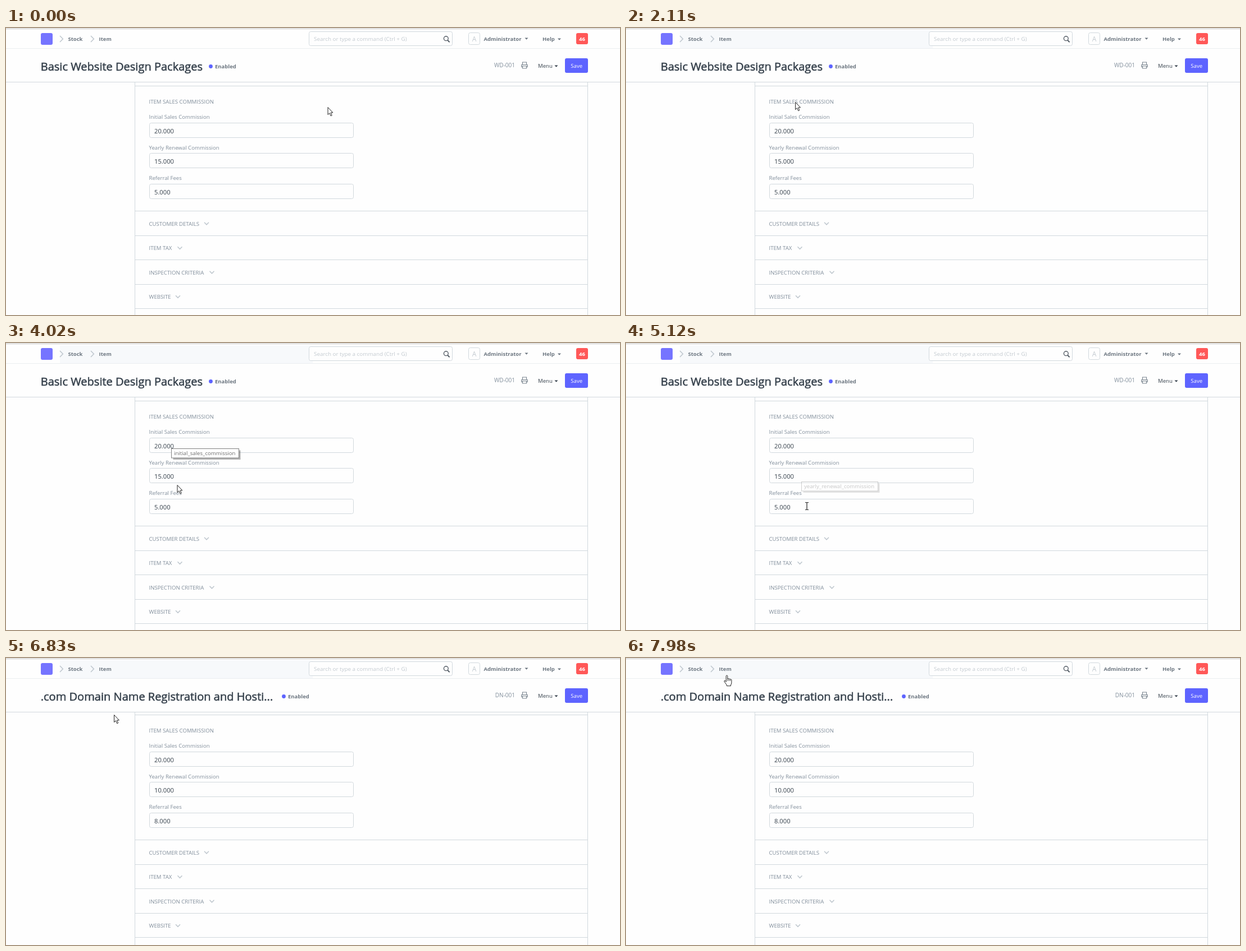
Animation of 1093x512 px, one loop 8 s. Source, as an HTML page:

```html
<!DOCTYPE html>
<html lang="en">
<head>
<meta charset="utf-8">
<title>Item form</title>
<style>
  html, body { margin: 0; width: 100%; height: 100%; overflow: hidden; background: #fefefe; }
  svg { display: block; width: 100%; height: 100%; }
  text { font-family: "Open Sans", "Noto Sans", sans-serif; font-size: 9.65px; fill: #818e9b; white-space: pre; }
  .strong { font-weight: 700; font-size: 9.5px; fill: #6c7680; }
  .title { font-size: 20.05px; fill: #36414c; stroke: #36414c; stroke-width: .55px; }
  .value { font-size: 11.2px; fill: #36414c; }
  .section { font-size: 9.65px; }
  .box { fill: #fefefe; stroke: #d1d8dd; }
  .rule { fill: none; stroke: #d1d8dd; }
  .chevron { fill: none; stroke: #c0c8cf; stroke-width: 1.6; }
  .pointer { fill: #fff; stroke: #222; stroke-linejoin: round; }
</style>
</head>
<body>
<svg id="stage" viewBox="0 0 1093 512" preserveAspectRatio="none"></svg>
<script>
const LOOP = 8000, SWITCH_AT = 6070;
const stage = document.getElementById("stage");

function add(parent, tag, attrs = {}, content) {
  const el = document.createElementNS("http://www.w3.org/2000/svg", tag);
  for (const key in attrs) el.setAttribute(key, attrs[key]);
  if (content !== undefined) el.textContent = content;
  parent.appendChild(el);
  return el;
}
const group = parent => add(parent, "g");
const path = (parent, d, attrs) => add(parent, "path", { d, ...attrs });
const label = (parent, x, y, content, attrs) => add(parent, "text", { x, y, ...attrs }, content);
const rect = (parent, x, y, width, height, attrs) => add(parent, "rect", { x, y, width, height, ...attrs });
const show = (el, on) => el.setAttribute("visibility", on ? "visible" : "hidden");
const caret = (parent, x, y, fill) => path(parent, `M${x - 3} ${y - 1.5}h6l-3 3.2z`, { fill });
const crumbArrow = x => path(stage, `M${x} 14l5.3 5.5l-5.3 5.5`, { class: "chevron" });

function buildForm(values) {
  const form = group(stage);
  path(form, "M229.5 90V520M1035.5 90V520", { class: "rule" });
  for (const y of [103.5, 326.5, 370.5, 413.5, 457.5, 500.5])
    path(form, `M229.5 ${y}H1035.5`, { class: "rule" });
  label(form, 254.5, 135, "ITEM SALES COMMISSION", { class: "section" });
  ["Initial Sales Commission", "Yearly Renewal Commission", "Referral Fees"].forEach((name, i) => {
    const y = i * 54.6;
    label(form, 254.5, 162 + y, name);
    rect(form, 255.5, 169.5 + Math.floor(y), 363, 26, { class: "box", rx: 3 });
    label(form, 264, 187.5 + y, values[i], { class: "value" });
  });
  [["CUSTOMER DETAILS", 357], ["ITEM TAX", 309.5], ["INSPECTION CRITERIA", 366.5], ["WEBSITE", 306]]
    .forEach(([name, x], i) => {
      const y = 349 + i * 43.5;
      label(form, 254.5, y + 3.7, name, { class: "section" });
      path(form, `M${x - 4} ${y - 2.2}l4 4l4 -4`, { class: "chevron" });
    });
  return form;
}

function buildHeading(title, dotX, code) {
  const heading = group(stage);
  label(heading, 61.7, 75.5, title, { class: "title" });
  add(heading, "circle", { cx: dotX, cy: 68.5, r: 3.4, fill: "#5e64ff" });
  label(heading, dotX + 7.5, 72, "Enabled", { class: "strong" });
  label(heading, 906, 70, code, { "text-anchor": "end", style: "font-size:10px" });
  return heading;
}

function buildTooltip(x, y, width, content) {
  const tip = group(stage);
  rect(tip, x + 3, y + 3, width, 16.5, { fill: "#000", opacity: .3 });
  rect(tip, x, y, width, 16.5, { fill: "#fff", stroke: "#808080" });
  label(tip, x + 4.5, y + 11.5, content, { style: "fill:#6b6b6b" });
  return tip;
}

rect(stage, 0, 0, 1093, 512, { fill: "#fefefe" });
const forms = [
  buildForm(["20.000", "15.000", "5.000"]),
  buildForm(["20.000", "10.000", "8.000"])
];
forms[1].setAttribute("transform", "translate(0 -2)");

// Fixed navigation and page head
rect(stage, 0, 0, 1093, 96, { fill: "#fefefe" });
const navTint = rect(stage, 96, 4, 450, 32, { fill: "#f7f9fb" });
path(stage, "M0 1.5H1093", { stroke: "#c4c4c4" });
path(stage, "M0 36.5H1093", { stroke: "#ebeef0" });
path(stage, "M0 96.5H1093", { class: "rule" });
rect(stage, 62, 9, 21, 21, { rx: 3, fill: "#7574ff" });
crumbArrow(96);
const itemArrow = crumbArrow(151);
label(stage, 110.5, 23, "Stock", { class: "strong" });
const itemCrumb = label(stage, 165.5, 23, "Item", { class: "strong" });
rect(stage, 539.5, 6.5, 255, 25, { class: "box", rx: 3 });
label(stage, 548, 23, "Search or type a command (Ctrl + G)", { style: "font-size:9.86px;fill:#c3cad0" });
add(stage, "circle", { cx: 783.3, cy: 18.7, r: 3.9, fill: "none", stroke: "#555d66", "stroke-width": 1.4 });
path(stage, "M786.2 21.8l3.4 3.6", { stroke: "#555d66", "stroke-width": 2 });
rect(stage, 823.5, 8.5, 20, 21, { class: "box", rx: 3 });
label(stage, 833.5, 23.5, "A", { "text-anchor": "middle", style: "font-size:12px;fill:#c3cad0" });
label(stage, 850.5, 23, "Administrator", { class: "strong" });
caret(stage, 926.5, 19, "#6c7680");
label(stage, 955, 23, "Help", { class: "strong" });
caret(stage, 985, 20, "#6c7680");
rect(stage, 1015, 9, 21, 20, { rx: 3, fill: "#ff5858" });
label(stage, 1025.5, 23, "46", { class: "strong", "text-anchor": "middle", style: "fill:#fff" });

path(stage, "M919.5 65v-4h7v4M919.5 69.5h-1.7v-4h10.4v4h-1.7M919.5 68h7v4h-7z",
  { fill: "none", stroke: "#7d8892", "stroke-width": 1.2 });
label(stage, 947, 71, "Menu", { style: "fill:#36414c" });
caret(stage, 979.5, 68, "#36414c");
rect(stage, 995, 54, 41, 26, { rx: 3, fill: "#5e64ff" });
label(stage, 1015.7, 70.8, "Save", { "text-anchor": "middle", style: "fill:#fff" });

const headings = [
  buildHeading("Basic Website Design Packages", 364.5, "WD-001"),
  buildHeading(".com Domain Name Registration and Hosti...", 494.5, "DN-001")
];

const statusBar = path(stage, "M-1 513V509.5H359Q361.5 509.5 361.5 513", { fill: "#f4f4f4", stroke: "#cfcfcf" });

const tooltips = [
  { el: buildTooltip(294.5, 188.5, 120, "initial_sales_commission"), from: 3870, fade: 4090 },
  { el: buildTooltip(312.5, 247.5, 136, "yearly_renewal_commission"), from: 4850, fade: 5020 }
];

// Each pointer is drawn around its hot spot at 0,0
const pointers = { arrow: group(stage), hand: group(stage), beam: group(stage) };
path(pointers.arrow, "M.5 .5V13.6L3.4 10.8L5.6 15.8L7.7 14.9L5.6 10H9.4Z", { class: "pointer" });
path(pointers.hand,
  "M-1.3 11.5V1.3Q-1.3 0 0 0T1.3 1.3V6Q2.6 4.9 3.7 6.4Q5 5.5 6 7Q7.6 6.2 8.4 8V13Q8.4 15 7 17V18.8H-.2V17L-4.6 11Q-5 9 -3.2 9.3Z",
  { class: "pointer" });
path(pointers.hand, "M1.3 6V10M3.7 6.6V10M6 7.2V10", { stroke: "#222", "stroke-width": .8 });
path(pointers.beam, "M-3 -6.5H-1L0 -5.8L1 -6.5H3M0 -6V6M-3 6.5H-1L0 5.8L1 6.5H3",
  { fill: "none", stroke: "#222", "stroke-width": 1.2 });

// time, x, y of the pointer's hot spot
const route = [
  [0, 572.5, 141], [300, 572.5, 141], [650, 410, 62], [900, 215, 18], [1010, 182, 20],
  [1190, 182, 20], [1320, 189.5, 34], [1570, 189.5, 34], [1900, 255, 98], [2370, 336, 164],
  [2750, 322, 188], [3080, 289, 138], [3370, 289, 138], [3640, 298, 180], [3890, 298, 180],
  [4020, 304.5, 253], [4200, 312, 254], [4450, 316, 239], [4850, 316, 239], [5120, 322, 291],
  [5320, 365, 190], [5560, 440, -25], [6440, 225, -25], [6560, 220, 20], [6830, 192, 101],
  [7260, 187, 78], [7290, 187, 78], [7460, 185, 72], [7770, 185, 72], [7980, 179.5, 31], [LOOP, 179.5, 31]
];

// Rate of change at a stop; zero beside a rest
function slope(i, axis) {
  const [a, b, c] = [route[i - 1], route[i], route[i + 1]];
  if (!a || !c) return 0;
  const before = (b[axis] - a[axis]) / (b[0] - a[0]), after = (c[axis] - b[axis]) / (c[0] - b[0]);
  return before * after > 0 ? 2 * before * after / (before + after) : 0;
}

function pointerAt(t) {
  const i = route.findIndex((stop, k) => k && t < stop[0]) - 1;
  const a = route[i], b = route[i + 1], span = b[0] - a[0], u = (t - a[0]) / span;
  return [1, 2].map(axis => {
    const ease = u * u * (3 - 2 * u);
    return a[axis] + (b[axis] - a[axis]) * ease
      + span * u * (1 - u) * ((1 - u) * slope(i, axis) - u * slope(i + 1, axis));
  });
}

function pointerKind(x, y, page) {
  const titleEnd = page ? 477 : 350;
  if (x > 160 && x < 196 && y > 8 && y < 36) return "hand";
  if (x > 62 && x < titleEnd && y > 56 && y < 82) return "hand";
  const inInput = [169, 224, 279].some(top => y > top - 2 * page && y < top + 26 - 2 * page);
  return inInput && x > 255 && x < 619 ? "beam" : "arrow";
}

function render(t) {
  const page = t >= SWITCH_AT ? 1 : 0;
  [0, 1].forEach(i => { show(forms[i], i === page); show(headings[i], i === page); });

  const hovered = t >= 930 && t < 1610;
  itemCrumb.style.fill = hovered ? "#36414c" : "";
  itemArrow.style.stroke = hovered ? "#36414c" : "";
  show(navTint, t >= 900);
  show(statusBar, t >= 1190 && t < 1650);

  for (const { el, from, fade } of tooltips) {
    const opacity = Math.min((t - from) / 80, 1 - (t - fade) / 160, 1);
    el.setAttribute("opacity", Math.max(0, opacity));
  }

  const [x, y] = pointerAt(t), kind = pointerKind(x, y, page);
  for (const name in pointers) show(pointers[name], name === kind);
  pointers[kind].setAttribute("transform", `translate(${x.toFixed(1)} ${y.toFixed(1)})`);
}

const start = performance.now();
function tick() {
  render((performance.now() - start) % LOOP);
  requestAnimationFrame(tick);
}
tick();
</script>
</body>
</html>
```
